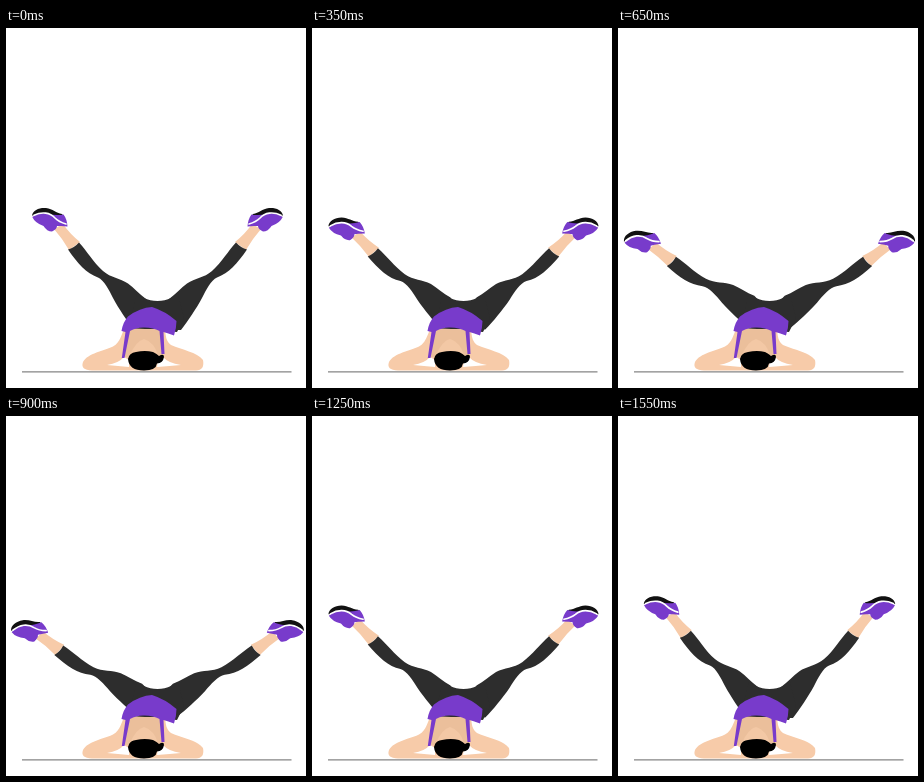
Write an HTML page that moves like this. It is 300 px wide and 360 px high and loops after 1600 ms.

```html
<!DOCTYPE html>
<html lang="en">
<head>
<meta charset="utf-8">
<title>Leg spread exercise</title>
<style>
  html, body { margin: 0; width: 100%; height: 100%; overflow: hidden; background: #fff; }
  svg { display: block; width: 300px; height: 360px; }
  .skin { fill: #f7cba9; }
  .back { fill: #ebbf9b; }
  .neck { fill: #f3c8a5; }
  .dark { fill: #2d2d2d; }
  .top { fill: #783bcb; }
  .black { fill: #111; }
  .hair { fill: #000; }
  .gap { fill: #fff; }
  .trim { fill: none; stroke: #fff; stroke-width: 1.7; stroke-linecap: round; }
</style>
</head>
<body>
<svg viewBox="0 0 300 360">
  <defs>
    <g id="leg">
      <path class="skin" d="M48 201 L57 196 Q64 206 74 214 L63 222 Q56 210 48 201Z"/>
      <path class="dark" d="M62 221.5 Q68 220 73 214.5 C81 223 87 234 97 243 C105 250 114 250 122 255.5 C128 260 133 266 140 271 L150 288 L140 302 L128 302 C121 293 113 281 107 270 C103 262 98 252 92 249.500 C80 245 72 236 62 221.5Z"/>
      <path class="black" d="M26 187.500 C27 182 33 179.5 40 180 C47 181 50 185 56 186 L58 189 L40 187Z"/>
      <path class="top" d="M26.300 189 Q33 184.500 41 185.500 Q50 188 57.500 186.500 Q61 191 61.500 198.500 L55 198 L51 198 Q51 201 46 203.500 Q41 203.500 37.500 198 Q29 195 26.300 189Z"/>
      <path class="trim" d="M28 187.300 C36 183.500 44 184.500 49 190 Q53 194 60 196"/>
    </g>
  </defs>

  <path d="M16 343.900H285.500" stroke="#858585" stroke-width="1.2"/>

  <g id="left"><use href="#leg"/></g>
  <g transform="translate(303 0) scale(-1 1)"><g id="right"><use href="#leg"/></g></g>
  <path class="dark" d="M131 266 L138 270 Q144 273 151.500 273 Q159 273 165 270 L172 266 L178 290 L171 304 L122 300Z"/>

  <path class="skin" d="M119 300 L159 302 C160 309 160 313 165 317 C176 322 191 324 197 332 Q199 342 190 342.500 L86 342.500 Q74 342 77 334 C82 325 98 323 107 318.500 C115 314 115 306 119 300Z"/>
  <path class="gap" d="M101 337 Q113 335 118 329 L123 332 L123 339 Q112 338 101 337Z"/>
  <path class="gap" d="M175 337 Q162 335 157 329 L152 333 L151 339 Q164 338 175 337Z"/>
  <path class="back" d="M120 301 L155 301 L156 327 L118 329Z"/>
  <path class="neck" d="M124 327 Q130 313 138 311 Q148 314 152 327Z"/>
  <path class="top" d="M115.5 303 Q117 294 122 288.500 Q134 279.500 146 279 Q159 283 170.500 293 Q170.500 300 168 307.500 Q162 305 157.500 304 L158.500 326 L155.500 326 L153.500 303 Q146 299 137 299.500 Q130 299.500 124 303 L118.500 330 L115.800 330 L119.500 304Z"/>
  <path class="hair" d="M122 331 Q123 325 130 324 Q139 322 147 324 Q151 326 153 328 Q158 325 158 329 Q157 335 151 335.500 Q150 342.500 138 342.500 Q123 342.500 122 331Z"/>
</svg>
<script>
  const LOOP = 1600, STEP = 50, SWING = 14.8;
  const legs = ["left", "right"].map(id => document.getElementById(id));
  const start = performance.now();

  function draw(now) {
    const elapsed = Math.max(0, now - start) % LOOP;
    const t = Math.floor(elapsed / STEP) * STEP / LOOP;
    const angle = -SWING * (1 - Math.cos(2 * Math.PI * t)) / 2;
    for (const leg of legs) leg.setAttribute("transform", `rotate(${angle} 125 285)`);
    requestAnimationFrame(draw);
  }
  draw(start);
</script>
</body>
</html>
```
